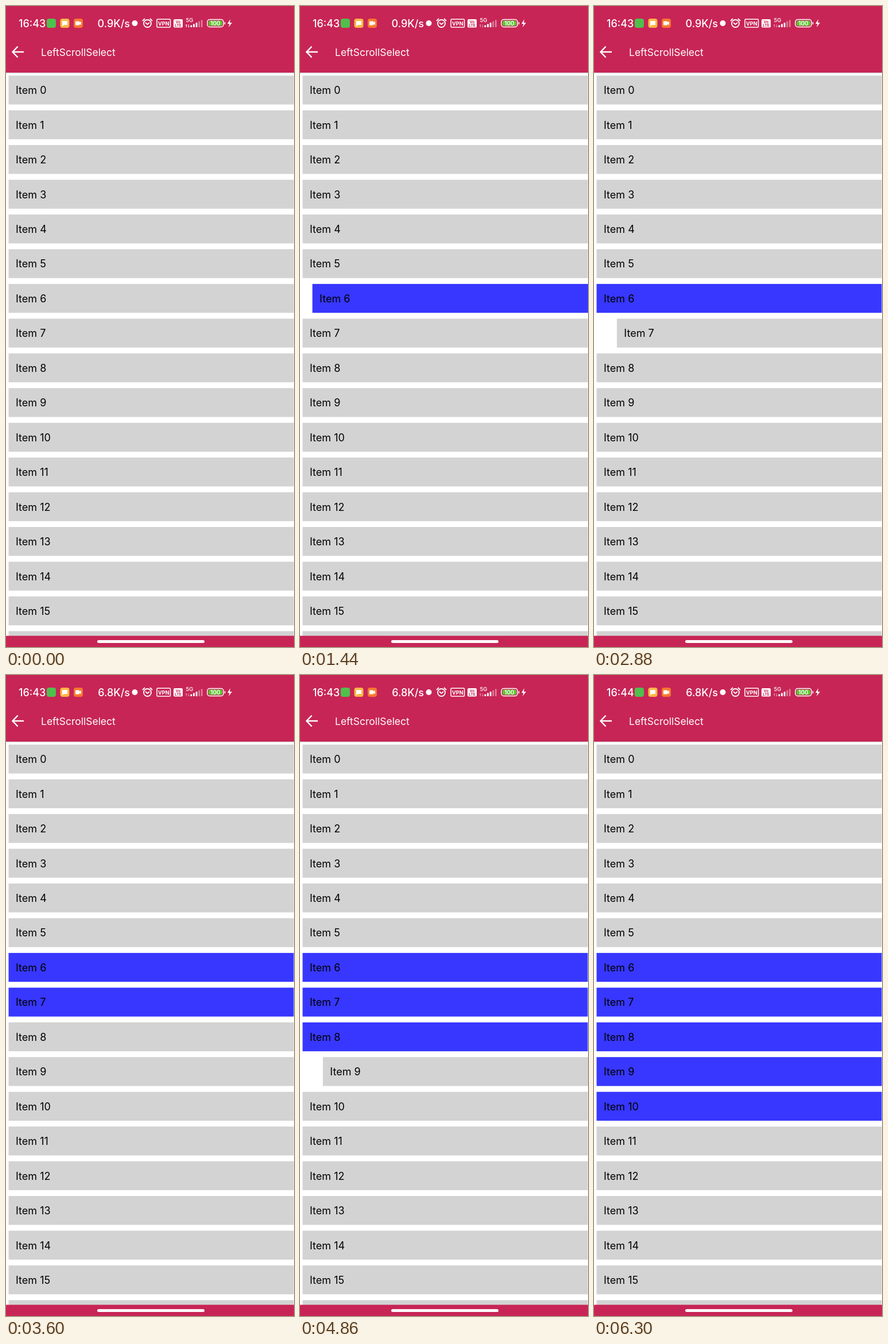
Write an HTML page that moves like this. It is 502x1116 px and loops after 6480 ms.

```html
<!DOCTYPE html>
<html lang="en">
<head>
<meta charset="utf-8">
<title>LeftScrollSelect</title>
<style>
  html, body { margin: 0; width: 100%; height: 100%; overflow: hidden; background: #fff; }
  svg { display: block; width: 502px; height: 1116px; font-family: Inter, Roboto, sans-serif; }
  .bar { fill: #c72556; }
  .line { fill: none; stroke: #fff; }
  .light { fill: #fff; }
</style>
</head>
<body>
<svg viewBox="0 0 502 1116">
  <g id="list" font-size="18"></g>

  <rect class="bar" width="502" height="116"/>
  <rect y="116" width="502" height="1.5" fill="#000" opacity=".12"/>
  <rect class="bar" y="1096.5" width="502" height="20"/>
  <rect class="light" x="159" y="1104" width="187" height="5" rx="2.5"/>

  <path class="line" d="M31 80H12M20.500 70.500L11.500 80L20.500 89.500" stroke-width="2.500"/>
  <text class="light" x="61" y="87" font-size="17.500">LeftScrollSelect</text>

  <g class="light" font-size="18" font-weight="500">
    <text id="clock" x="22" y="36.500"></text>
    <text id="speed" x="216" y="36.500" text-anchor="end"></text>
  </g>

  <rect x="71" y="22" width="16" height="16" rx="4" fill="#4fc04c"/>
  <rect x="94.500" y="22" width="16" height="16" rx="4" fill="#fbb645"/>
  <path class="light" d="M98 26h9v7h-6l-3 2.500z"/>
  <rect x="118" y="22" width="16" height="16" rx="4" fill="#f7782f"/>
  <path class="light" d="M121 26.500h7v2l3-1.500v6l-3-1.500v2h-7z"/>

  <circle class="light" cx="224.500" cy="30" r="5"/>
  <g class="line" stroke-width="1.800">
    <circle cx="246.500" cy="30.500" r="6.500"/>
    <path d="M243 29l3.500 3l3.500-3M238 26l4-4M255 26l-4-4"/>
    <rect x="263" y="23" width="23.500" height="14" rx="1.500" stroke-width="1.500"/>
    <rect x="351" y="23.500" width="28" height="13" rx="4" stroke-width="1.500"/>
  </g>
  <rect class="light" x="292" y="23" width="16" height="14.500" rx="2"/>
  <g font-weight="700" text-anchor="middle">
    <text class="light" x="274.800" y="33.500" font-size="9">VPN</text>
    <text class="bar" x="300" y="29.500" font-size="6.500">Vo</text>
    <text class="bar" x="300" y="36" font-size="6.500">LTE</text>
    <text class="light" x="320" y="28" font-size="9.500" font-weight="500">5G</text>
  </g>
  <path id="data" class="line" d="M314.500 37v-5l-1.500 2M318 32v5l1.500-2" stroke-width="1"/>
  <g id="signal" class="light"></g>
  <rect x="353" y="25.500" width="24" height="9" rx="2.500" fill="#5cc72f"/>
  <text class="light" x="365" y="34" font-size="10" font-weight="600" text-anchor="middle">100</text>
  <path class="line" d="M381.500 28v4" stroke-width="1.500"/>
  <path class="light" d="M391 23l-5 8h3.500l-1.500 6l6-8h-4z"/>
</svg>

<script>
const LOOP = 6480, STEP = 180, SWIPE = 720, REACH = 50;
const FIRST = 6, STARTS = [800, 2700, 3600, 4680, 5580];
const $ = id => document.getElementById(id);

function add(parent, tag, attrs, text = '') {
  const el = document.createElementNS('http://www.w3.org/2000/svg', tag);
  for (const key in attrs) el.setAttribute(key, attrs[key]);
  el.textContent = text;
  return parent.appendChild(el);
}

const rows = Array.from({ length: 17 }, (_, i) => {
  const y = 121.2 + i * 60.45, group = add($('list'), 'g', {});
  const box = add(group, 'rect', { x: 4.5, y, width: 497, height: 50.3 });
  add(group, 'text', { x: 17, y: y + 32 }, 'Item ' + i);
  return { group, box };
});

for (let i = 0; i < 5; i++) {
  const height = 3.5 + i * 2.3;
  add($('signal'), 'rect', {
    x: 321.5 + i * 4.6, y: 37 - height, width: 2.8, height, rx: .8, opacity: i < 3 ? 1 : .4
  });
}

function draw(now) {
  const t = Math.floor(now % LOOP / STEP) * STEP;
  rows.forEach(({ group, box }, i) => {
    const u = (t - STARTS[i - FIRST]) / SWIPE;
    const shift = u > 0 && u < 1 ? REACH * Math.sin(Math.PI * u) : 0;
    group.setAttribute('transform', `translate(${shift})`);
    box.setAttribute('fill', u >= .5 ? '#3737ff' : '#d3d3d3');
  });
  $('clock').textContent = t < 5040 ? '16:43' : '16:44';
  $('speed').textContent = t < 3060 ? '0.9K/s' : '6.8K/s';
  $('data').setAttribute('opacity', t < 180 ? 1 : .5);
}

const begin = performance.now();
(function tick() {
  draw(performance.now() - begin);
  requestAnimationFrame(tick);
})();
</script>
</body>
</html>
```
